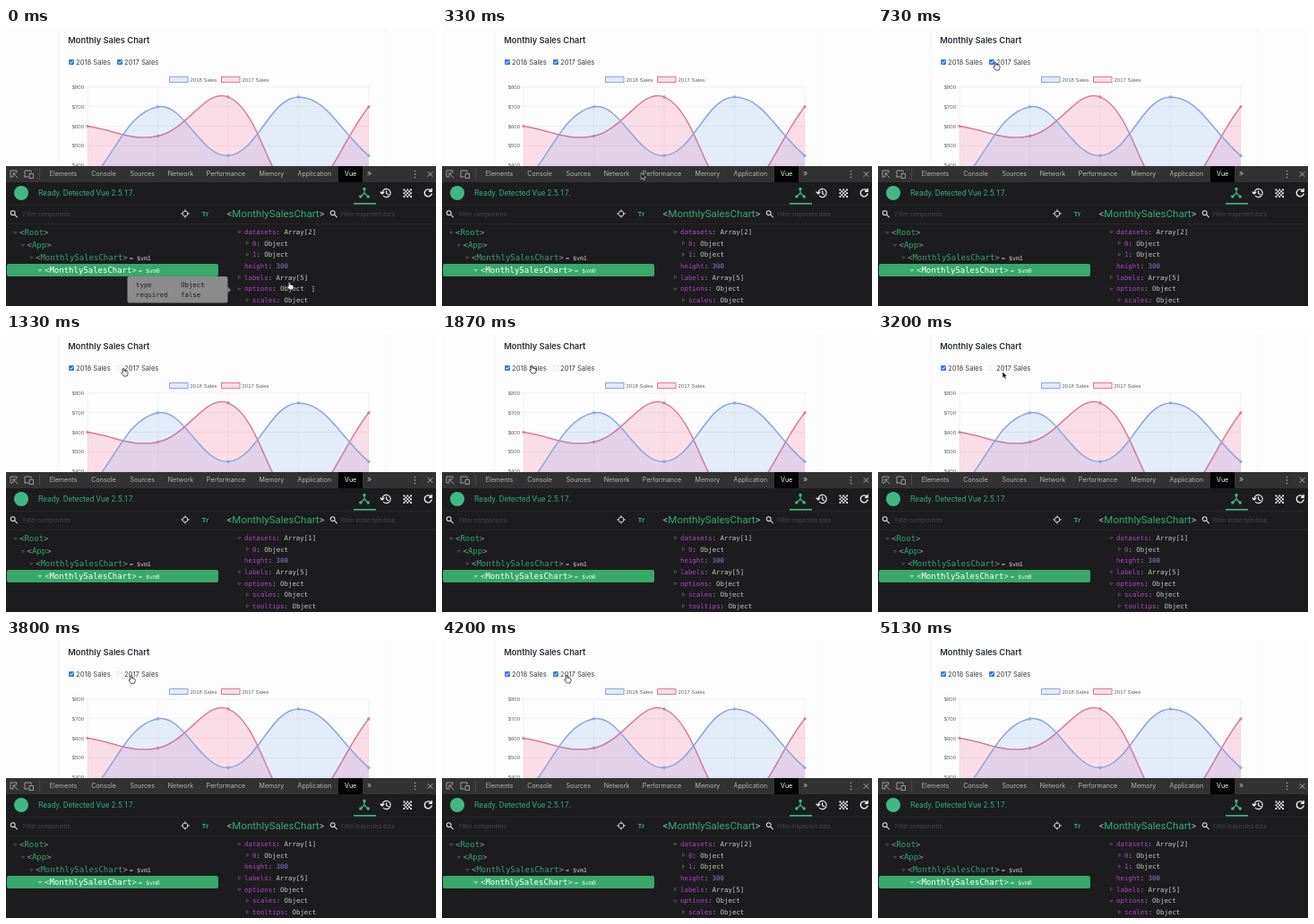
Recreate the animation shown at these times as an HTML page. Size 480x310 px, loop 5870 ms.

```html
<!DOCTYPE html>
<html lang="en">
<head>
<meta charset="utf-8">
<title>Monthly Sales Chart</title>
<style>
html, body { margin: 0; width: 100%; height: 100%; overflow: hidden; background: #fdfdfd; }
svg { display: block; width: 480px; height: 310px; }
text { white-space: pre; }
.ui { font-family: Inter, Roboto, sans-serif; }
.axis { font: 6px "Liberation Sans", Arial, sans-serif; fill: #666; }
.head { font-family: Roboto, sans-serif; fill: #38a577; }
.hint { font-family: Roboto, sans-serif; fill: #444; }
.mono { font-family: "DejaVu Sans Mono", monospace; }
.line { fill: none; stroke-linecap: round; stroke-linejoin: round; }
</style>
</head>
<body>
<svg id="stage" viewBox="0 0 480 310"></svg>
<script>
const LOOP = 5870, STEP = 1000 / 15;
const GREEN = '#41b883', GREY = '#a5a5a5';
const BLUE = '#8ca6da', RED = '#da7c98';

const rect = (x, y, w, h, fill, more = '') =>
  `<rect x="${x}" y="${y}" width="${w}" height="${h}" fill="${fill}" ${more}/>`;
const text = (x, y, str, cls, size, fill, more = '') =>
  `<text x="${x}" y="${y}" class="${cls}"${size ? ` font-size="${size}"` : ''}${fill ? ` fill="${fill}"` : ''} ${more}>${str}</text>`;
const line = (d, color, width = 1, more = '') =>
  `<path class="line" d="${d}" stroke="${color}" stroke-width="${width}" ${more}/>`;
const span = (str, fill) => `<tspan fill="${fill}">${str}</tspan>`;
const tag = (name, fill, edge) => span('&lt;', edge) + span(name, fill) + span('&gt;', edge);

// Chart
const px = i => 91 + i * 78.5;
const py = v => 66 + (800 - v) * 0.218;

function spline(values) {
  const p = values.map((v, i) => [px(i), py(v)]);
  const handles = p.map((c, i) => {
    const a = p[i - 1] || c, b = p[i + 1] || c;
    const da = Math.hypot(c[0] - a[0], c[1] - a[1]);
    const db = Math.hypot(b[0] - c[0], b[1] - c[1]);
    const shift = k => [c[0] + k * (b[0] - a[0]), c[1] + k * (b[1] - a[1])];
    return [shift(-0.4 * da / (da + db)), shift(0.4 * db / (da + db))];
  });
  return 'M' + p[0] + p.slice(1).map((c, i) => `C${handles[i][1]} ${handles[i + 1][0]} ${c}`).join('');
}

function series(values, color, fill) {
  const d = spline(values);
  return `<path d="${d}V220H91Z" fill="${fill}"/>` + line(d, color, 1.5) +
    values.map((v, i) => `<circle cx="${px(i)}" cy="${py(v)}" r="1.4" fill="${fill}" stroke="${color}" stroke-width=".8"/>`).join('');
}

function chart() {
  let s = '';
  for (let v = 800; v >= 400; v -= 100) {
    s += line(`M86 ${py(v)}H405`, '#e6e6e6', 0.6) +
      text(87, py(v) + 2, '$' + v, 'axis', 0, '', 'text-anchor="end"');
  }
  for (let i = 0; i < 5; i++) s += line(`M${px(i)} 66V154`, '#ececec', 0.6);
  s += series([600, 550, 750, 250, 700], RED, 'rgba(235,60,120,.16)');
  s += series([300, 700, 450, 750, 450], BLUE, 'rgba(80,135,225,.14)');
  [[182, 2018, BLUE, '#e3ebf9'], [240, 2017, RED, '#fbdfe8']].forEach(([x, year, color, fill]) => {
    s += rect(x + 0.5, 54.5, 20.5, 6, fill, `stroke="${color}"`) + text(x + 23.5, 60, year + ' Sales', 'axis');
  });
  return s;
}

function page() {
  return rect(0, 0, 480, 310, '#fdfdfd') + line('M58.5 0V154M422.5 0V154', '#f9f9f9') +
    text(69.3, 17, 'Monthly Sales Chart', 'ui', 9.3, '#2a2e33', 'font-weight="600"') +
    text(78, 40.5, '2018 Sales', 'ui', 7.6, '#3a3e44') +
    text(132, 40.5, '2017 Sales', 'ui', 7.6, '#3a3e44') + chart();
}

function checkbox(x, on) {
  return on
    ? rect(x, 35, 6, 6, '#3579e6', 'rx="1"') + line(`M${x + 1.3} 38.1l1.3 1.3 2.2-2.8`, '#fff', 0.9)
    : rect(x + 0.25, 35.25, 5.5, 5.5, '#fff', 'rx="1" stroke="#d2d2d2" stroke-width=".5"');
}

// Developer tools
const glass = (x, y) => line(`M${x + 1.2} ${y + 1.2}l2.6 2.6M${x + 1.6} ${y - 0.8}a2.4 2.4 0 1 0-4.8 0a2.4 2.4 0 1 0 4.8 0`, '#ddd', 1.1);

function toolbar() {
  const tabs = [[48.7, 'Elements'], [95.3, 'Console'], [138.5, 'Sources'], [180.7, 'Network'],
    [223.7, 'Performance'], [282.5, 'Memory'], [325.5, 'Application']];
  return rect(0, 154, 480, 18, '#323232') + rect(371, 154, 27, 18, '#050505') +
    tabs.map(([x, name]) => text(x, 165.3, name, 'ui', 7.1, '#b4b4b4')).join('') +
    text(378, 165.3, 'Vue', 'ui', 7.1, '#fff') + text(403, 165.3, '»', 'ui', 9, '#b4b4b4') +
    line('M8 166H5V159H12V161M8 162l5 5M8 165V162H11', GREY, 0.9) +
    line('M21 166V159H28V161M21 166H25M26.5 162.5H30.5V167.5H26.5Z', GREY, 0.9) +
    line('M37.5 157V169', '#4c4c4c', 0.8) +
    line('M456.5 159.5v.1M456.5 163v.1M456.5 166.5v.1', '#bbb', 1.4) +
    line('M471 160.5l5 5M476 160.5l-5 5', '#bbb', 0.9);
}

function header() {
  let grid = '';
  for (let i = 0; i < 25; i += 2) grid += rect(443.5 + i % 5 * 1.9, 179.5 + Math.floor(i / 5) * 1.9, 1.9, 1.9, '#eee');
  return `<circle cx="17" cy="184" r="8" fill="${GREEN}"/>` +
    text(36, 187.3, 'Ready. Detected Vue 2.5.17.', 'head', 8.7) +
    line('M400 179.5V184L396 188M400 184L404 188', GREEN, 1.3) +
    [[400, 179.5], [395.8, 188], [404.2, 188]].map(([x, y]) => `<circle cx="${x}" cy="${y}" r="1.7" fill="${GREEN}"/>`).join('') +
    rect(388, 195, 25, 1.6, GREEN) +
    line('M420 184a4.6 4.6 0 1 1 1.5 3.4M418 183l2 2 2-2M424.7 181.5V184.5l2 1.2', '#eee', 1.2) + grid +
    line('M474.5 181.5a4 4 0 1 0 .6 3.5M475.2 179.5v2.8h-2.8', '#eee', 1.4);
}

function panes() {
  const name = 'MonthlySalesChart';
  const rows = [[15, 231, 'Root'], [23.5, 245, 'App'], [33, 259, name]];
  return line('M0 197.5H480M0 218.5H480', '#272727', 0.8) +
    glass(8.5, 207) + text(19, 209.5, 'Filter components', 'hint', 6.6) +
    line('M203 207a3 3 0 1 0-6 0a3 3 0 1 0 6 0M200 202.6v2M200 209.4v2M195.6 207h2M202.4 207h2', '#ddd', 0.9) +
    text(218.5, 209.7, 'Tr', 'head', 8, '', 'font-weight="700"') +
    text(246.5, 210.8, tag(name, '#38a577', '#9fb5aa'), 'head', 11.5) +
    glass(365.5, 207) + text(374, 209.5, 'Filter inspected data', 'hint', 6.6) +
    rows.map(([x, y, label]) => line(`M${x - 6} ${y - 3.6}h3l-1.5 2z`, '#666', 0.6) +
      text(x, y, tag(label, '#37a173', '#8b9a92'), 'mono', 9)).join('') +
    text(138, 258.5, '= $vm1', 'mono', 6.6, '#ccc') +
    rect(1, 263, 236, 14, '#38a86c', 'rx="2"') + line('M36.5 269.4h3l-1.5 2z', '#d5eee0', 0.6) +
    text(43, 273, tag(name, '#fff', '#d9f2e5'), 'mono', 9) +
    text(148, 272.5, '= $vm0', 'mono', 6.6, '#e6f6ed');
}

// Fields: [depth, caret, key, value]; carets are '' none, '>' closed, 'v' open.
function fields(count) {
  const list = [[0, 'v', 'datasets', `Array[${count}]`]];
  for (let i = 0; i < count; i++) list.push([1, '>', i, 'Object']);
  list.push([0, '', 'height', '300'], [0, '>', 'labels', 'Array[5]'], [0, 'v', 'options', 'Object'],
    [1, '>', 'scales', 'Object'], [1, '>', 'tooltips', 'Object'], [0, '', 'width', '500']);
  return list.slice(0, 7).map(([depth, caret, key, value], i) => {
    const x = 266 + depth * 9, y = 229.8 + i * 12.7;
    const mark = caret && line(caret === 'v' ? `M${x - 7} ${y - 3}h3l-1.5 2z` : `M${x - 6.5} ${y - 4}v3l2-1.5z`, '#777', 0.5);
    return mark + text(x, y, span(key, '#b044c4') + span(': ', '#aaa') +
      span(value, isNaN(value) ? '#c6c6c6' : '#8f78d8'), 'mono', 7.4);
  }).join('');
}

function tooltip() {
  const row = (y, key, value) => text(145, y, key, 'mono', 7.4, '#262626') + text(195, y, value, 'mono', 7.4, '#1c1c1c');
  return rect(135.5, 277, 112, 29.5, '#8b8b8b', 'rx="2"') + '<path d="M247.5 288.5l3.5 3.5-3.5 3.5z" fill="#8b8b8b"/>' +
    row(288.5, 'type', 'Object') + row(300, 'required', 'false') +
    line('M343 288.5v.1M343 291v.1M343 293.5v.1', '#ddd', 1.5);
}

// Pointer stops: [time, x, y]
const stops = [[0, 314, 283], [670, 129, 38], [1600, 129, 38], [1870, 98, 35], [3000, 98, 35],
  [3200, 139, 42], [3530, 139, 42], [3870, 137, 39], [4735, 137, 39], [4870, 150, -14]];

function pointer(t) {
  const i = stops.findIndex(s => s[0] > t);
  if (i < 0) return '';
  const [t0, x0, y0] = stops[i - 1], [t1, x1, y1] = stops[i];
  const k = (t - t0) / (t1 - t0), e = k * k * (3 - 2 * k);
  const hand = t < 100 || (t > 590 && t < 3100) || (t > 3700 && t < 4790);
  const shape = hand
    ? 'M1.2 .8Q2.2-.2 3 .8V3.4Q4-.1 4.4 3.6Q5.5 3 5.8 4.1Q7 3.7 7 5V6.6L6 9H2.4L-.3 5.6Q0 4.3 1.2 5.2Z'
    : 'M0 0V7.2L1.7 5.7L2.8 8.3L4.1 7.7L3 5.2H5.2Z';
  return `<path transform="translate(${x0 + (x1 - x0) * e} ${y0 + (y1 - y0) * e})" d="${shape}" ` +
    `fill="${hand ? '#fff' : '#111'}" stroke="${hand ? '#222' : '#fff'}" stroke-width="${hand ? 0.8 : 0.5}"/>`;
}

const stage = document.getElementById('stage');
stage.innerHTML = page() + rect(0, 154, 480, 156, '#1c1c1e') + toolbar() + header() + panes() + '<g id="live"></g>';
const live = document.getElementById('live');

const within = (t, a, b) => t >= a && t < b;
const has2017 = t => !within(t, 1260, 4130);
const has2018 = t => !within(t, 2130, 2860);

function draw(now) {
  const t = Math.floor((now % LOOP + 4) / STEP) * STEP;
  const seen = t - 60;   // the inspector follows one step later
  live.innerHTML = checkbox(70, has2018(t)) + checkbox(124, has2017(t)) +
    fields(has2018(seen) + has2017(seen)) + (t < 190 ? tooltip() : '') + pointer(t);
}

const start = performance.now();
function tick() {
  draw(performance.now() - start);
  requestAnimationFrame(tick);
}
tick();
</script>
</body>
</html>
```
